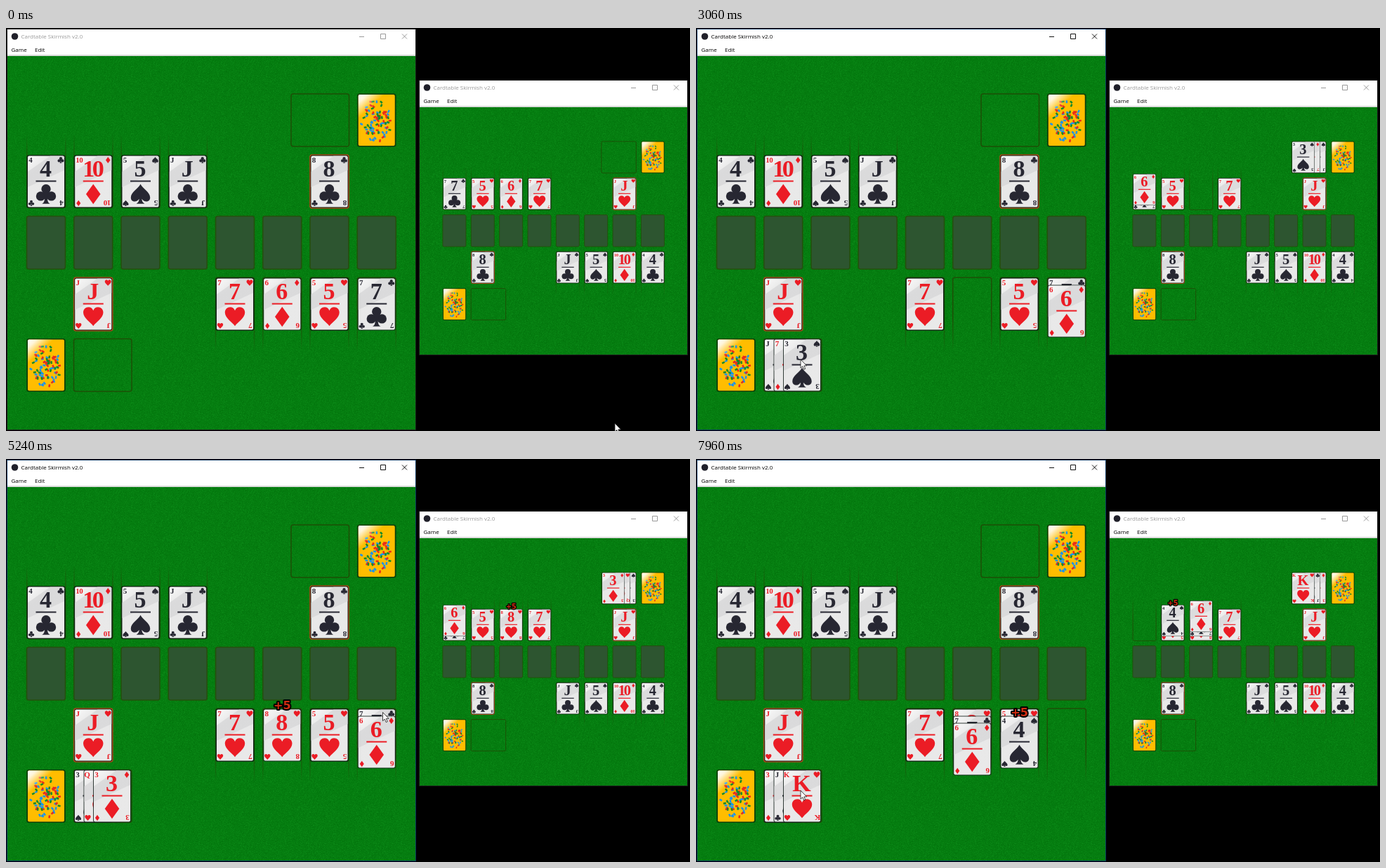
Recreate the animation shown at these times as an HTML page. Size 974 px wide and 575 px high, loop 8 s.

```html
<!DOCTYPE html>
<html lang="en">
<head>
<meta charset="utf-8">
<title>Card game</title>
<style>
  html, body { margin: 0; width: 100%; height: 100%; overflow: hidden; background: #000; }
  svg { display: block; width: 100%; height: 100%; }
  text { user-select: none; }
  .ui { font: 8px "Open Sans", "Noto Sans", sans-serif; }
  .rank { font: bold 34px "Liberation Serif", serif; text-anchor: middle; }
  .corner { font: bold 11px "Liberation Serif", serif; text-anchor: middle; }
  .points { font: bold 16px "DejaVu Sans", sans-serif; text-anchor: middle;
    stroke: #000; stroke-width: 4px; paint-order: stroke; stroke-linejoin: round; }
</style>
</head>
<body>
<svg id="stage" viewBox="0 0 974 575" xmlns="http://www.w3.org/2000/svg">
  <defs>
    <pattern id="felt" width="96" height="96" patternUnits="userSpaceOnUse">
      <rect width="96" height="96" fill="#057d10"/>
      <path id="dark" stroke="#03760d"/>
      <path id="light" stroke="#098615"/>
    </pattern>
    <linearGradient id="paper" x2=".6" y2="1">
      <stop stop-color="#fafafa"/><stop offset=".3" stop-color="#e8e8e8"/><stop offset="1" stop-color="#e9e9e9"/>
    </linearGradient>
    <linearGradient id="shine" gradientUnits="userSpaceOnUse" x1="-26" y1="-36.500" x2="-9" y2="-18">
      <stop stop-color="#fff"/><stop offset=".35" stop-color="#fff" stop-opacity=".85"/>
      <stop offset="1" stop-color="#fff" stop-opacity="0"/>
    </linearGradient>
    <linearGradient id="fade" gradientUnits="userSpaceOnUse" x1="0" y1="356" x2="0" y2="462">
      <stop offset=".55" stop-color="#1d4f06"/><stop offset="1" stop-color="#1d4f06" stop-opacity="0"/>
    </linearGradient>
    <path id="heart" d="M0 13.500C-4 8-14.500 2-14.500-6C-14.500-11-11-14-7-14C-3.500-14-1-12 0-9C1-12 3.500-14 7-14C11-14 14.500-11 14.500-6C14.500 2 4 8 0 13.500Z"/>
    <path id="diamond" d="M0-14.500L10.500 0L0 14.500L-10.500 0Z"/>
    <path id="spade" d="M0-14.500C3-8 14-3 14 5C14 12 5 12.500 2 7C2 10 3 12.500 6 14H-6C-3 12.500-2 10-2 7C-5 12.500-14 12-14 5C-14-3-3-8 0-14.500Z"/>
    <g id="club">
      <circle cy="-7.500" r="6.800"/><circle cx="-7.700" cy="3" r="6.800"/><circle cx="7.700" cy="3" r="6.800"/>
      <path d="M-4-3H4L2 5C2 10 3 12.500 6 14H-6C-3 12.500-2 10-2 5Z"/>
    </g>
    <rect id="rest" x="-27.800" y="-38" width="55.600" height="76" rx="3.500" fill="#0b3008" opacity=".8"/>
    <g id="back"></g>
    <g id="table"></g>
  </defs>
  <rect width="974" height="575"/>
  <g id="windows"></g>
  <g id="boards"></g>
  <g id="mouse">
    <circle id="press" r="8" fill="#f6e53c" opacity=".72"/>
    <path d="M0 0V14.500L3.300 11.400L5.600 16.800L8 15.700L5.700 10.600H10.200Z" transform="scale(.84)" fill="#fff" stroke="#222" stroke-width="1"/>
  </g>
</svg>
<script>
const LOOP = 8000, SLIDE = 150, POINTS_LIFE = 1200;
const MID_X = 292.5, MID_Y = 306.25;
const $ = id => document.getElementById(id);
const col = i => 57 + 67.25 * i;
const OWN = 394, RIVAL = 219, DECK = [57, 481];
const waste = i => [124 + 13.5 * i, 481];

let seed = 4711;
const random = () => (seed = seed * 16807 % 2147483647) / 2147483647;

function add(parent, markup) {
  const g = document.createElementNS('http://www.w3.org/2000/svg', 'g');
  g.innerHTML = markup;
  parent.append(g);
  return g;
}
const moveTo = (el, x, y) => el.setAttribute('transform', `translate(${x} ${y})`);
const show = (el, on) => el.setAttribute('visibility', on ? 'visible' : 'hidden');

/* felt, card back and table */
const specks = n => Array.from({ length: n }, () =>
  `M${Math.floor(random() * 96)} ${Math.floor(random() * 96) + .5}h1`).join('');
$('dark').setAttribute('d', specks(1900));
$('light').setAttribute('d', specks(1700));

const confetti = (color, n) => {
  let d = '';
  for (let i = 0; i < n; i++) {
    const a = random() * 6.283, r = random() ** .6;
    const b = random() * 6.283;
    d += `M${(Math.cos(a) * r * 20 - 1).toFixed(1)} ${(Math.sin(a) * r * 29 + 1).toFixed(1)}`
      + `l${(Math.cos(b) * 4).toFixed(1)} ${(Math.sin(b) * 4).toFixed(1)}`;
  }
  return `<path d="${d}" stroke="${color}" stroke-width="2.5" fill="none"/>`;
};
$('back').innerHTML = '<use href="#rest"/>'
  + '<rect x="-26" y="-36.500" width="52" height="73" rx="2" fill="#ffbd00"/>'
  + confetti('#1e93ea', 36) + confetti('#ea2a1c', 28) + confetti('#14892a', 24)
  + '<rect x="-26" y="-36.500" width="52" height="73" rx="2" fill="url(#shine)"/>';

const foundations = Array.from({ length: 8 }, (_, i) =>
  `<rect x="${col(i) - 27.5}" y="268.500" width="55" height="75.500" rx="3" fill="#2d5530" stroke="#24500d" stroke-width="1.600"/>`).join('');
const columns = [4, 5, 6, 7].map(i =>
  `<path d="M${col(i) - 27.5} 460V359q0-3 3-3h49q3 0 3 3V460" fill="none" stroke="url(#fade)" stroke-width="1.500"/>`).join('');
const side = columns
  + '<rect x="96.500" y="443.500" width="82.500" height="75" rx="3" fill="none" stroke="#1d4f06" stroke-width="1.500"/>';
$('table').innerHTML = foundations + side
  + `<g transform="rotate(180 ${MID_X} ${MID_Y})">${side}</g>`;

/* card faces */
const suits = { H: 'heart', D: 'diamond', S: 'spade', C: 'club' };
function face(name) {
  const rank = name.slice(0, -1), suit = name.slice(-1), wide = rank.length > 1;
  const ink = 'HD'.includes(suit) ? '#eb1c25' : '#272732';
  const pip = (x, y, s) => `<use href="#${suits[suit]}" transform="translate(${x} ${y}) scale(${s})"/>`;
  const corner = `<text class="corner" x="${wide ? -20 : -22}" y="-26.800"${wide ? ' letter-spacing="-.6"' : ''}>${rank}</text>`;
  return '<rect x="-27" y="-37.500" width="54" height="75" rx="3" fill="#14201a" opacity=".85"/>'
    + '<rect x="-26" y="-36.500" width="52" height="73" rx="2" fill="url(#paper)"/>'
    + '<path d="M-26-14L6-36.500H24L26-34.500V-16L-26 8Z" fill="#d9d9da" opacity=".85"/>'
    + `<g fill="${ink}"><text class="rank" x="${wide ? -1.5 : -.5}" y="-7"${wide ? ' letter-spacing="-3.500"' : ''}>${rank}</text>`
    + `<path d="M-14.500-1.500h29v2h-29z"/>${pip(0, 18, .98)}${pip(21, -30.5, .31)}${pip(-21, 31, .29)}`
    + `${corner}<g transform="rotate(180)">${corner}</g></g>`;
}
const resting = (name, reserve) => '<use href="#rest"/>'
  + (reserve ? '<rect x="-27.500" y="-38" width="55" height="76" rx="3" fill="none" stroke="#b8461a" stroke-width="1.600"/>' : '')
  + face(name);

/* pointer: time, x, y */
const path = [
  [0, 867, 564], [70, 867, 564], [580, 384, 382], [750, 384, 382], [950, 367, 394], [1150, 367, 394],
  [1520, 415, 396], [1670, 499, 402], [1860, 499, 402], [2340, 55, 478], [2600, 62, 477],
  [2980, 149, 473], [3130, 149, 473], [3310, 52, 479], [3420, 70, 478], [3530, 108, 476], [3760, 155, 477],
  [3930, 155, 477], [4090, 90, 478], [4310, 164, 477], [4450, 167.5, 477.5], [4630, 411, 407], [4720, 411, 397],
  [5240, 536.5, 361.5], [5300, 536.5, 361.5], [5860, 399, 377], [5930, 399, 377],
  [6100, 196, 440], [6200, 55, 478], [6570, 62, 478], [6800, 62, 478], [7000, 148, 469.5],
  [7050, 148, 469.5], [7180, 266, 453], [7410, 457, 393], [7460, 457, 393], [7700, 275, 446],
  [7940, 149, 473], [LOOP, 149, 473]
];
const presses = [[950, 1800], [2400, 2480], [3320, 3400], [4450, 4720], [5290, 5900], [6190, 6270], [7030, 7450]];
const mix = (a, b, k) => [a[0] + (b[0] - a[0]) * k, a[1] + (b[1] - a[1]) * k];

function pointer(t) {
  const i = Math.max(1, path.findIndex(p => p[0] >= t));
  const a = path[i - 1], b = path[i];
  return mix(a.slice(1), b.slice(1), (t - a[0]) / (b[0] - a[0]));
}

/* moving cards, lowest first */
const DEAL = [2440, 3350, 6230], REFLOW = [4830, 7600];
const slide = (t, to) => ({ t, to });
const drag = (grab, t, to) => ({ grab, t, to });
const deal = (n, i) => slide(DEAL[n], waste(i));
const reflow = (n, i) => slide(REFLOW[n], waste(i));
const eight = drag(4450, 4720, [col(5), OWN]);
const four = drag(7030, 7450, [col(6), OWN + 10]);

const moving = [
  ['JS', DECK, [deal(0, 0)]],
  ['7D', DECK, [deal(0, 1), deal(1, 0)]],
  ['3S', DECK, [deal(0, 2), deal(1, 0)]],
  ['QH', DECK, [deal(1, 0), reflow(0, 1), deal(2, 0)]],
  ['3D', DECK, [deal(1, 1), reflow(0, 2), deal(2, 0)]],
  ['8H', DECK, [deal(1, 2), eight]],
  ['7C', [col(7), OWN], [drag(5290, 5930, [col(5), OWN + 10])]],
  ['6D', [col(5), OWN], [drag(950, 1840, [col(7), OWN + 10]), drag(5290, 5930, [col(5), OWN + 20])]],
  ['JC', DECK, [deal(2, 0), reflow(1, 1)]],
  ['KH', DECK, [deal(2, 1), reflow(1, 2)]],
  ['4S', DECK, [deal(2, 2), four]]
];
const fixed = [
  ['4C', 0, RIVAL], ['10D', 1, RIVAL], ['5S', 2, RIVAL], ['JC', 3, RIVAL], ['8C', 6, RIVAL, true],
  ['JH', 1, OWN, true], ['7H', 4, OWN], ['5H', 6, OWN]
];

/* The player's own board follows the pointer; the remote one only sees the drop. */
function place([, home, moves], t, own) {
  let p = home;
  for (const { t: at, to, grab } of moves) {
    if (own && grab && t >= grab) {
      const from = pointer(grab), now = pointer(Math.min(t, at));
      p = [p[0] + now[0] - from[0], p[1] + now[1] - from[1]];
    }
    const start = grab && !own ? at - 60 : at;
    if (t < start) break;
    p = mix(p, to, Math.min(1, (t - start) / SLIDE));
  }
  return p;
}

/* windows */
function makeWindow(x, y, w, h) {
  const r = x + w;
  return add($('windows'), `
    <rect class="rim" x="${x - .5}" y="${y - .5}" width="${w + 1}" height="${h + 1}" fill="none" stroke="#1c1c1c"/>
    <rect x="${x}" y="${y}" width="${w}" height="${h}" fill="url(#felt)"/>
    <rect x="${x}" y="${y}" width="${w}" height="38" fill="#fff"/>
    <rect x="${x}" y="${y + 36}" width="${w}" height="2" fill="#dcdcdc"/>
    <circle cx="${x + 10.5}" cy="${y + 10}" r="4.800" fill="#20202a"/>
    <g class="ui"><text class="head" x="${x + 19.5}" y="${y + 13}" fill="#999">Cardtable Skirmish v2.0</text>
      <text x="${x + 5.5}" y="${y + 32}">Game</text><text x="${x + 39}" y="${y + 32}">Edit</text></g>
    <path class="tools" d="M${r - 80} ${y + 10.5}h7M${r - 49.5} ${y + 6.5}h7v7h-7zM${r - 19} ${y + 6.5}l7 7m0-7l-7 7" fill="none" stroke="#999"/>`);
}
const front = makeWindow(2, 2, 581, 571);
makeWindow(589, 75, 381, 391);
const rim = front.querySelector('.rim'), head = front.querySelector('.head'), tools = front.querySelector('.tools');

/* boards */
function makeBoard(own) {
  const root = add($('boards'), '<use href="#table"/>');
  if (!own) root.setAttribute('transform', `translate(779.75 289.25) scale(.6) translate(${-MID_X} ${-MID_Y})`);
  const spot = ([x, y]) => own ? [x, y] : [2 * MID_X - x, 2 * MID_Y - y];
  const put = (markup, p) => {
    const el = add(root, markup);
    moveTo(el, ...spot(p));
    return el;
  };
  put('<use href="#back"/>', DECK);
  put('<use href="#back"/>', [col(7), 131.5]);
  fixed.forEach(([name, i, y, reserve]) => put(resting(name, reserve), [col(i), y]));
  const cards = moving.map(c => put(face(c[0]), c[1]));
  const points = put('<text class="points" y="5.500">+5</text>', DECK);

  return t => {
    moving.forEach((c, i) => {
      moveTo(cards[i], ...spot(place(c, t, own)));
      show(cards[i], c[1] !== DECK || t >= c[2][0].t);
    });
    const drop = [eight, four].find(m => t >= m.t && t < m.t + POINTS_LIFE);
    show(points, drop);
    if (drop) {
      const k = (t - drop.t) / POINTS_LIFE, [x, y] = spot(drop.to);
      moveTo(points, x, y - 56 * (1 - (1 - k) ** 2.5));
      const glow = 1 - k ** 3;
      points.setAttribute('fill', `rgb(${225 * glow},${48 * glow},${18 * glow})`);
    }
  };
}
const boards = [makeBoard(true), makeBoard(false)];

function draw(t) {
  const active = t >= 950;
  rim.setAttribute('stroke', active ? '#0a3561' : '#1c1c1c');
  head.setAttribute('fill', active ? '#000' : '#999');
  tools.setAttribute('stroke', active ? '#111' : '#999');
  boards.forEach(update => update(t));
  moveTo($('mouse'), ...pointer(t));
  show($('press'), presses.some(([a, b]) => t >= a && t < b));
}

const begin = performance.now();
function tick() {
  draw((performance.now() - begin) % LOOP);
  requestAnimationFrame(tick);
}
tick();
</script>
</body>
</html>
```
